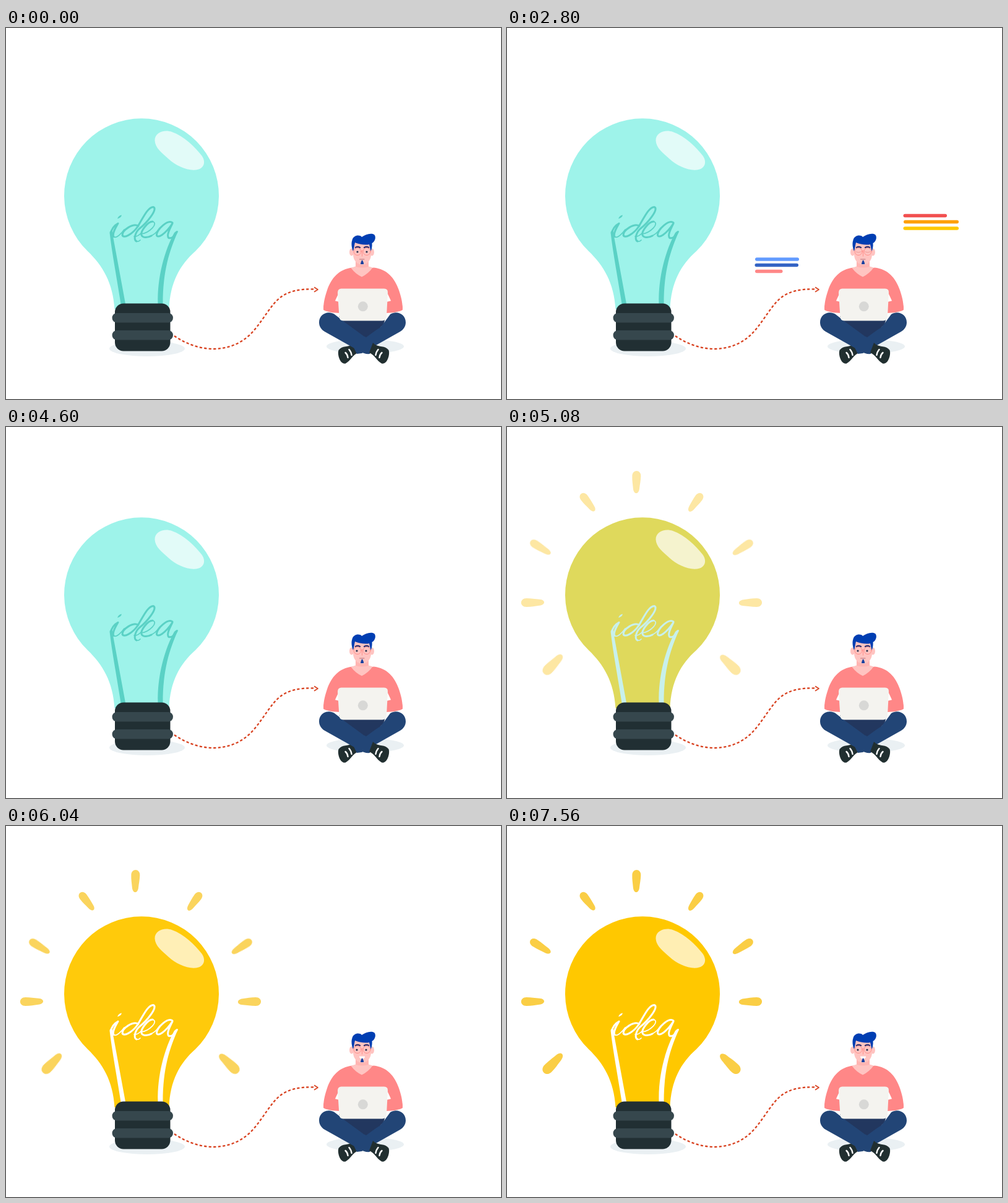
Write an HTML page that moves like this. It is 800 px wide and 600 px high and loops after 8 s.

```html
<!DOCTYPE html>
<html lang="en">
<head>
<meta charset="utf-8">
<title>Idea</title>
<style>
html, body { margin: 0; width: 100%; height: 100%; overflow: hidden; background: #fff; }
svg { display: block; width: 800px; height: 600px; }
.line { fill: none; stroke-linecap: round; stroke-linejoin: round; }
</style>
</head>
<body>
<svg viewBox="0 0 800 600">
  <defs>
    <path id="torsoHalf" fill="#ff8787" d="M578 468V392L560 387.5C538 390 526 404 519 424C514 439 513 447 513 456L520 458L532 441L538 428L542 468Z"/>
    <path id="forearm" fill="#ff8787" d="M513 452C514 441 523 438 531 441L543 444V461C532 461 524 460 516 457.500C514 457 513 455 513 452Z"/>
    <g id="shoe">
      <path fill="#212f30" d="M540 518.500C547 513 556 517 563 509L569 525C560 529 557 538 549 542.500C541 545 536 531 537 523.500Q537.500 520 540 518.500Z"/>
      <path class="line" stroke="#fff" stroke-width="2.400" d="M548.500 525Q552 528 552.500 533M554.500 520Q558 524 558.500 529"/>
    </g>
  </defs>

  <!-- light bulb -->
  <ellipse cx="228" cy="518.500" rx="61" ry="12.500" fill="#eaf0f3"/>
  <g id="rays" fill="#face45"></g>
  <path id="glass" d="M132 361A125 125 0 1 1 306 361C281 383 265 412 263.500 455H175.500C173 412 156 384 132 361Z"/>
  <path fill="#fff" opacity=".7" d="M240.500 182C240 169 256 163.500 268 168C288 175 305 192 316 206C324 217 320 228 307 229.500C292 231 274 222 263 212C252 202 241 194 240.500 182Z"/>
  <g id="wire">
    <path d="M167.500 331Q168 327 172 328L173.500 340L193 446H185.500C179 404 171 362 167.500 331Z"/>
    <path d="M278 329C264 360 253.500 393 253.500 446H245.500C244 403 257 358 272 331Q277 326 278 329Z"/>
    <path d="M180 308.500Q182 303 187 302.500Q186 307 180 308.500Z"/>
    <g id="script" class="line">
      <path stroke-width="3" d="M169.500 332C170 326 175 319 181 316C177 323 171 333 174 337.500M213 321C222 306 229 290 238 289.500C246 292 229 314 215 325C208 332 206 343 211 345M237 313C229 313 217 329 219 335C221 340 230 339 235 336M269 315C262 309 243 326 243.500 335C245 341 257 334 269 316C264 326 259 336 263 339.500C268 341 273 336 276 330M214 320C205 315 188 327 188 335C190 341 204 334 213 321"/>
      <path stroke-width="1.700" d="M174 337.500C178 341 187 332 191 326M211 345Q214 346 217 343M219 333C232 331 247 316 237 313M235 336Q241 333 245 328M207 337Q213 338 220 330"/>
    </g>
  </g>
  <rect x="176" y="445.500" width="89.500" height="77" rx="14" fill="#212f33"/>
  <g fill="#36474d">
    <rect x="171.500" y="461" width="98.500" height="15.500" rx="7.700"/>
    <rect x="171.500" y="489" width="98.500" height="15.500" rx="7.700"/>
  </g>

  <!-- arrow -->
  <g class="line" stroke="#d8411f">
    <path style="stroke-linecap:butt" stroke-width="2.300" stroke-dasharray="4.200 3.300" d="M272 498C291 511 313 519 336 519C365 518.500 386 506 400 490C417 470 428 448 443 436C456 426 474 421.500 498 422.500"/>
    <path stroke-width="1.500" d="M498.500 419.500L504 423L498.500 426.500"/>
  </g>

  <!-- text lines -->
  <g id="bars" class="line" stroke-width="5.600"></g>

  <!-- man -->
  <ellipse cx="580.500" cy="515" rx="62.500" ry="11.500" fill="#eaf0f3"/>
  <use href="#shoe"/>
  <path fill="#22375f" d="M538 466H614L610 480L578 506L545 480Z"/>
  <g fill="#224576">
    <path d="M621 463C632 456 646 463 646 476C646 483 642 488 637 491L575 526L567 527L562 517L566 512L607 482Z"/>
    <path d="M531 463C520 456 506 463 506 476C506 483 510 488 515 491L572 523Q580 528 588 527L594 509L545 474Z"/>
  </g>
  <path fill="#22375f" d="M544 473H609L604 485L579 499Z"/>
  <use href="#shoe" transform="translate(1156)scale(-1 1)"/>
  <use href="#torsoHalf"/>
  <use href="#torsoHalf" transform="translate(1154)scale(-1 1)"/>
  <use href="#forearm" id="armL"/>
  <g transform="translate(1154)scale(-1 1)"><use href="#forearm" id="armR"/></g>
  <path fill="#f4f3ef" d="M542 421.500H611Q617.500 421.500 617 428L615 467Q614 473.500 608 473.500H545Q539 473.500 538.500 467L536 428Q536 421.500 542 421.500Z"/>
  <circle cx="576.800" cy="450.300" r="8" fill="#d8d8d6"/>
  <path fill="#ffc4c1" d="M557.500 388L565 385.500H586L592.500 387.500Q586 397 575 402.500Q565 398 557.500 388Z"/>
  <path fill="#ffb5b2" d="M565 372H586V386Q575 389 565 386Z"/>
  <g fill="#ffc4c1">
    <ellipse cx="558.500" cy="362.500" rx="3.500" ry="6"/>
    <ellipse cx="591.500" cy="362.500" rx="3.500" ry="6"/>
    <path d="M561 345H590V366C590 376 583 383 575.500 383S561 376 561 366Z"/>
  </g>
  <path fill="#003eb2" d="M561 361C558 354 558 347 559.500 343C561 335.500 571 333.500 575 338C581 333.500 590 331 595 334C599 338 596 346 591.500 348C592 353 591 358 589.500 361L587 350C580 351.500 571 350 564 347C563 351 562.500 356 561 361Z"/>
  <path class="line" stroke="#2c3272" stroke-width="2.300" d="M565 355Q568 353 572 355M579 355Q583 353 586 355"/>
  <g class="line" stroke="#ff8c86" stroke-width=".9">
    <circle cx="568" cy="361.500" r="6"/>
    <circle cx="583" cy="361.500" r="6"/>
    <path d="M574 360.500Q575.500 359.500 577 360.500M575.500 362V369"/>
  </g>
  <g id="pupils" fill="#26304c">
    <circle cx="568" cy="362" r="1.600"/>
    <circle cx="583" cy="362" r="1.600"/>
  </g>
  <path id="lids" class="line" stroke="#e99792" stroke-width=".9" d="M564 362Q568 364 572 362M579 362Q583 364 587 362"/>
  <path id="neutral" class="line" stroke="#b5727c" stroke-width="1" d="M571.500 374H579"/>
  <path id="smile" fill="#fff" d="M571 372.500H580C580 375.500 578 376.800 575.500 376.800S571 375.500 571 372.500Z"/>
  <path fill="#1740a0" d="M575.500 375C577 377 578.500 380 578 382H573C573 380 574 377 575.500 375Z"/>
</svg>
<script>
const LOOP = 8000, STEP = 40;
const TEAL = [158, 243, 234], WIRE = [90, 209, 197], YELLOW = [255, 200, 0], WHITE = [255, 255, 255];
const $ = id => document.getElementById(id);
const ramp = (t, from, to) => Math.min(1, Math.max(0, (t - from) / (to - from)));
const mix = (a, b, k) => a.map((v, i) => v + (b[i] - v) * k);
const css = c => `rgb(${c.map(Math.round)})`;
const within = (t, from, to) => t >= from && t < to;
const show = (id, on) => $(id).style.display = on ? '' : 'none';

function add(parent, d, attrs) {
  const el = document.createElementNS('http://www.w3.org/2000/svg', 'path');
  el.setAttribute('d', d);
  for (const k in attrs) el.setAttribute(k, attrs[k]);
  return parent.appendChild(el);
}

// x, y, angle, length, width
const RAY = 'M-.5 -.27C-.5 -.58 .5 -.58 .5 -.27C.5 -.05 .42 .1 .38 .3C.32 .57 -.24 .57 -.34 .3C-.4 .1 -.5 -.05 -.5 -.27Z';
const ray = (x, y, angle, len, w) =>
  add($('rays'), RAY, { transform: `translate(${x} ${y})rotate(${angle})scale(${w} ${len})` });
ray(209, 89, 2, 36, 14);
for (const [x, y, angle, len, w] of [[393.5, 284, -90, 37, 14], [381, 195, 57, 38, 13], [304.5, 122, 37, 35, 13], [360.5, 384, 135, 42, 16]]) {
  ray(x, y, Math.abs(angle), len, w);
  ray(435 - x, y, -Math.abs(angle), len, w);
}

// x, y, width, colour, start, end
const bars = [
  [640.5, 303.5, 70.5, '#f25050', 400, 840],
  [641, 313.5, 89, '#ffa008', 960, 1360],
  [640.5, 324, 89.5, '#ffc800', 1280, 1680],
  [401, 374, 71, '#629bff', 1800, 2200],
  [400.5, 383.5, 70.5, '#3363c4', 2200, 2600],
  [401, 393.5, 89, '#ff8787', 2600, 3000]
].map(([x, y, w, stroke, from, to]) => ({ x, y, w, from, to, el: add($('bars'), '', { stroke }) }));

function draw(t) {
  for (const b of bars) {
    const w = b.w * ramp(t, b.from, b.to);
    b.el.setAttribute('d', w ? `M${b.x + 2.8} ${b.y}h${Math.max(0.01, w - 5.6)}` : '');
  }
  $('bars').style.opacity = 1 - ramp(t, 3600, 4000);

  const swing = t < 4600 ? 3 * Math.sin(t / 400 * 2 * Math.PI) : 0;
  $('armL').setAttribute('transform', `rotate(${swing} 518 450)`);
  $('armR').setAttribute('transform', `rotate(${-swing} 518 450)`);

  const blink = within(t, 2720, 2900) || within(t, 4320, 4480);
  show('pupils', !blink);
  show('lids', blink);
  $('pupils').setAttribute('transform', `translate(${-ramp(t, 1720, 1960)})`);
  show('smile', t >= 5600);
  show('neutral', t < 5600);

  const lit = ramp(t, 4920, 5160);
  const pulse = t < 4800 ? 0 : Math.abs((Math.min(t, 7560) - 4800) % 1840 / 920 - 1);
  $('glass').style.fill = css(mix(TEAL, mix(YELLOW, WHITE, 0.12 * pulse), lit));
  const wire = css(mix(WIRE, WHITE, lit));
  $('wire').style.fill = wire;
  $('script').style.stroke = wire;
  $('rays').style.opacity = lit * (1 - 0.38 * pulse);
}

const start = performance.now();
function tick() {
  const t = (performance.now() - start) % LOOP;
  draw(Math.floor(t / STEP) * STEP);
  requestAnimationFrame(tick);
}
tick();
</script>
</body>
</html>
```
